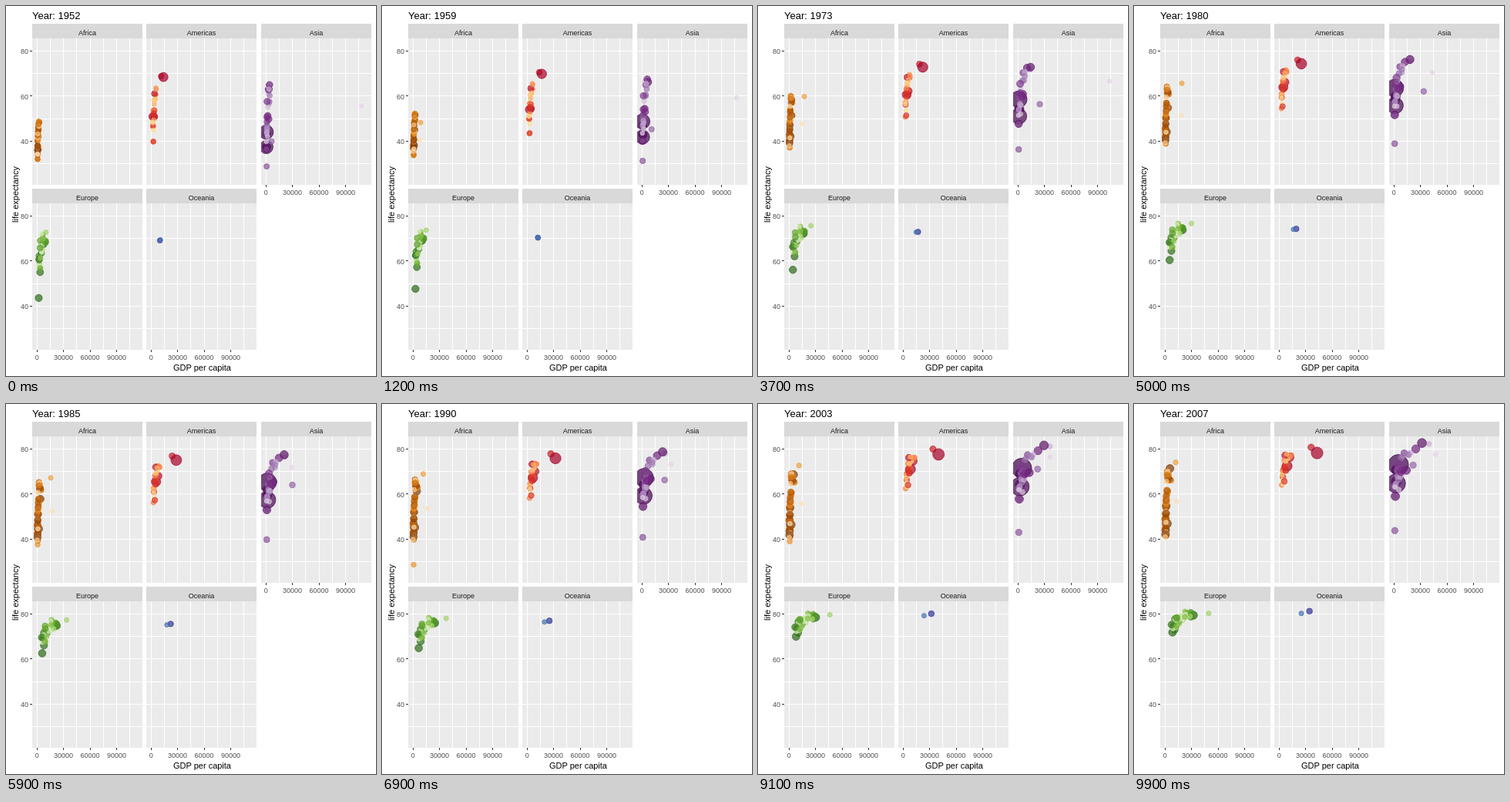
An HTML page that plays this animation: 480x480 px, repeating every 10 s.

```html
<!DOCTYPE html>
<html lang="en">
<head>
<meta charset="utf-8">
<title>Life expectancy and GDP per capita</title>
<style>
html, body { margin: 0; width: 100%; height: 100%; overflow: hidden; background: #fff; }
svg { display: block; }
text { font-family: "Liberation Sans", Arial, sans-serif; font-size: 9px; }
.mid { text-anchor: middle; }
.end { text-anchor: end; }
.tick { fill: #4d4d4d; }
.strip { fill: #1a1a1a; }
.title { font-size: 13px; }
.axis { font-size: 11px; }
line { shape-rendering: crispEdges; }
circle { fill-opacity: .7; stroke-opacity: .7; stroke-width: 1; }
</style>
</head>
<body>
<svg id="stage" width="480" height="480" viewBox="0 0 480 480"></svg>
<script>
const stage = document.getElementById('stage');
const W = 143, H = 190;
const STEP = 100, STEPS = 100;

// Local panel coordinates: GDP in thousands, life expectancy in years
const px = gdp => 6.2 + gdp * 1.147;
const py = life => (85.55 - life) * 2.927;
const radius = pop => 2.49 + 10.67 * Math.sqrt(pop / 1319);

// Per continent: population growth, how far life and GDP have come at half time,
// and the spread of the many countries: low-high at the start and at the end
const panels = [
  {
    name: 'Africa', ramp: ['#7f3b08', '#b35806', '#e08214', '#fdb863', '#fee0b6'],
    growth: .27, half: [.73, .5], count: 47, maxPop: 76,
    life: [[32, 49], [41, 70]], gdp: [[.35, 2.7], [.3, 8]]
  },
  {
    name: 'Americas', ramp: ['#a50026', '#d73027', '#f46d43', '#fdae61', '#fee090'],
    growth: .45, half: [.6, .38], count: 21, maxPop: 44,
    life: [[39, 66], [64, 79]], gdp: [[1.6, 6.5], [2.5, 16]]
  },
  {
    name: 'Asia', ramp: ['#40004b', '#762a83', '#9970ab', '#c2a5cf', '#e7d4e8'],
    growth: .4, half: [.67, .4], count: 24, maxPop: 120,
    life: [[33, 65], [59, 80]], gdp: [[.4, 6], [.9, 32]]
  },
  {
    name: 'Europe', ramp: ['#276419', '#4d9221', '#7fbc41', '#b8e186', '#e6f5d0'],
    growth: .75, half: [.52, .5], count: 27, maxPop: 61,
    life: [[55, 72], [73, 81]], gdp: [[1.5, 10], [6, 37]]
  },
  {
    name: 'Oceania', ramp: ['#313695', '#4575b4'],
    growth: .46, half: [.42, .38], count: 0
  }
];

// Countries that stand out: population in millions, life expectancy, GDP
const notable = {
  Africa: [
    [80, [41.9, 54.6, 71.3], [1.4, 5.6]],
    [1.45, [37, 56.7], [4.3, 18.5, 13.2]],
    [6, [42.7, 74], [2.4, 15.5, 19.3, 9.6, 12.1]],
    [135, [36.3, 46.9], [1.1, 2]],
    [8.9, [40, 44, 46, 24, 46.2], [.5, .86]]
  ],
  Americas: [
    [190, [50.9, 72.4], [2.1, 9.1]],
    [33, [68.8, 80.7], [11.4, 36.3]],
    [108, [50.8, 76.2], [3.5, 12]],
    [301, [68.4, 78.2], [14, 43]]
  ],
  Asia: [
    [31.9, [28.8, 43.8], [.8, 1]],
    [1319, [44, 73], [.4, .9, 5]],
    [7, [61, 82.2], [3, 39.7]],
    [1110, [37.4, 64.7], [.5, 2.4]],
    [223, [37.5, 70.7], [.7, 3.5]],
    [127, [63, 82.6], [3.2, 18, 31.7]],
    [2.5, [55.6, 77.6], [108, 113, 95, 81, 109, 59, 31, 28, 35, 40, 35, 47]],
    [169, [43.4, 65.5], [.7, 2.6]],
    [27.6, [39.9, 72.8], [6.5, 15.7, 33.9, 23.5, 21.7]]
  ],
  Europe: [
    [82, [67.5, 79.4], [7.1, 32.2]],
    [4.6, [72.7, 80.2], [10.1, 49.4]],
    [71, [43.6, 60.3, 71.8], [2, 8.5]]
  ],
  Oceania: [
    [20.4, [69.1, 81.2], [10, 34.4]],
    [4.1, [69.4, 80.2], [10.6, 25.2]]
  ]
};

function add(parent, tag, attrs, text) {
  const node = document.createElementNS('http://www.w3.org/2000/svg', tag);
  for (const key in attrs) node.setAttribute(key, attrs[key]);
  if (text !== undefined) node.textContent = text;
  return parent.appendChild(node);
}

const line = (parent, x1, y1, x2, y2, stroke) => add(parent, 'line', { x1, y1, x2, y2, stroke });
const label = (x, y, cls, text) => add(stage, 'text', { x, y, class: cls }, text);
const crisp = v => Math.floor(v) + .5;
const mix = (a, b, u) => a + (b - a) * u;

// Linear interpolation through evenly spaced values
function along(values, u) {
  const pos = u * (values.length - 1);
  const i = Math.min(Math.floor(pos), values.length - 2);
  return mix(values[i], values[i + 1], pos - i);
}

// A start and an end get a middle value
const bend = (v, half) => v.length === 2 ? [v[0], mix(v[0], v[1], half), v[1]] : v;

function rampColor(ramp, u) {
  const channel = k => Math.round(along(ramp.map(c => parseInt(c.slice(k, k + 2), 16)), u));
  return `rgb(${channel(1)},${channel(3)},${channel(5)})`;
}

function random(seed) {
  return () => {
    seed = (seed * 16807) % 2147483647;
    return seed / 2147483647;
  };
}

// The many: each keeps its standing within the spread, with a little jitter
function spread({ count, maxPop, life, gdp }, rnd) {
  return Array.from({ length: count }, (_, i) => {
    const health = Math.pow((i * .618 + .3) % 1, .85);
    const wealth = mix(health, rnd(), .35);
    const near = u => Math.min(1, Math.max(0, u + (rnd() - .5) * .25));
    return [
      maxPop * Math.pow(.02, rnd()),
      life.map(([lo, hi]) => mix(lo, hi, near(health))),
      gdp.map(([lo, hi]) => lo * Math.pow(hi / lo, near(wealth)))
    ];
  });
}

function drawXAxis(left, bottom) {
  for (const k of [0, 30, 60, 90]) {
    const x = left + px(k);
    line(stage, crisp(x), bottom, crisp(x), bottom + 3, '#333');
    label(x, bottom + 13, 'mid tick', k * 1000);
  }
}

function drawYAxis(left, top) {
  for (const v of [40, 60, 80]) {
    const y = top + py(v);
    line(stage, left - 3, crisp(y), left, crisp(y), '#333');
    label(left - 5, y + 4, 'end tick', v);
  }
}

const dots = [];

function drawPanel(p, index) {
  const col = index % 3;
  const x = Math.round(34 + col * 148.4), y = index < 3 ? 42 : 256;
  add(stage, 'rect', { x, y: y - 19, width: W, height: 19, fill: '#d9d9d9' });
  label(x + W / 2, y - 4, 'mid strip', p.name);

  const plot = add(stage, 'svg', { x, y, width: W, height: H, overflow: 'hidden' });
  add(plot, 'rect', { width: W, height: H, fill: '#ebebeb' });
  for (let v = 30; v <= 80; v += 10) line(plot, 0, crisp(py(v)), W, crisp(py(v)), '#fff');
  for (let k = 0; k <= 105; k += 15) line(plot, crisp(px(k)), 0, crisp(px(k)), H, '#fff');
  if (col === 0) drawYAxis(x, y);
  if (index > 1) drawXAxis(x, y + H);

  const rows = notable[p.name].concat(spread(p, random(4100 + index * 77)));
  const ranked = [...rows].sort((a, b) => b[0] - a[0]);
  for (const row of rows) {
    const [pop, life, gdp] = row;
    const color = rampColor(p.ramp, ranked.indexOf(row) / (rows.length - 1));
    dots.push({
      node: add(plot, 'circle', { fill: color, stroke: color }),
      pop: [pop * p.growth, pop],
      life: bend(life, p.half[0]),
      gdp: bend(gdp, p.half[1])
    });
  }
}

panels.forEach(drawPanel);
const title = label(34, 17, 'title', '');
label(254.5, 473, 'mid axis', 'GDP per capita');
add(stage, 'text', { class: 'mid axis', transform: 'translate(16 244.5) rotate(-90)' }, 'life expectancy');

let shown = -1;

function draw() {
  const step = Math.floor(performance.now() / STEP) % STEPS;
  if (step !== shown) {
    shown = step;
    const u = step / (STEPS - 1);
    title.textContent = 'Year: ' + Math.round(1952 + 55 * u);
    for (const d of dots) {
      d.node.setAttribute('cx', px(along(d.gdp, u)).toFixed(2));
      d.node.setAttribute('cy', py(along(d.life, u)).toFixed(2));
      d.node.setAttribute('r', radius(along(d.pop, u)).toFixed(2));
    }
  }
  requestAnimationFrame(draw);
}
draw();
</script>
</body>
</html>
```
